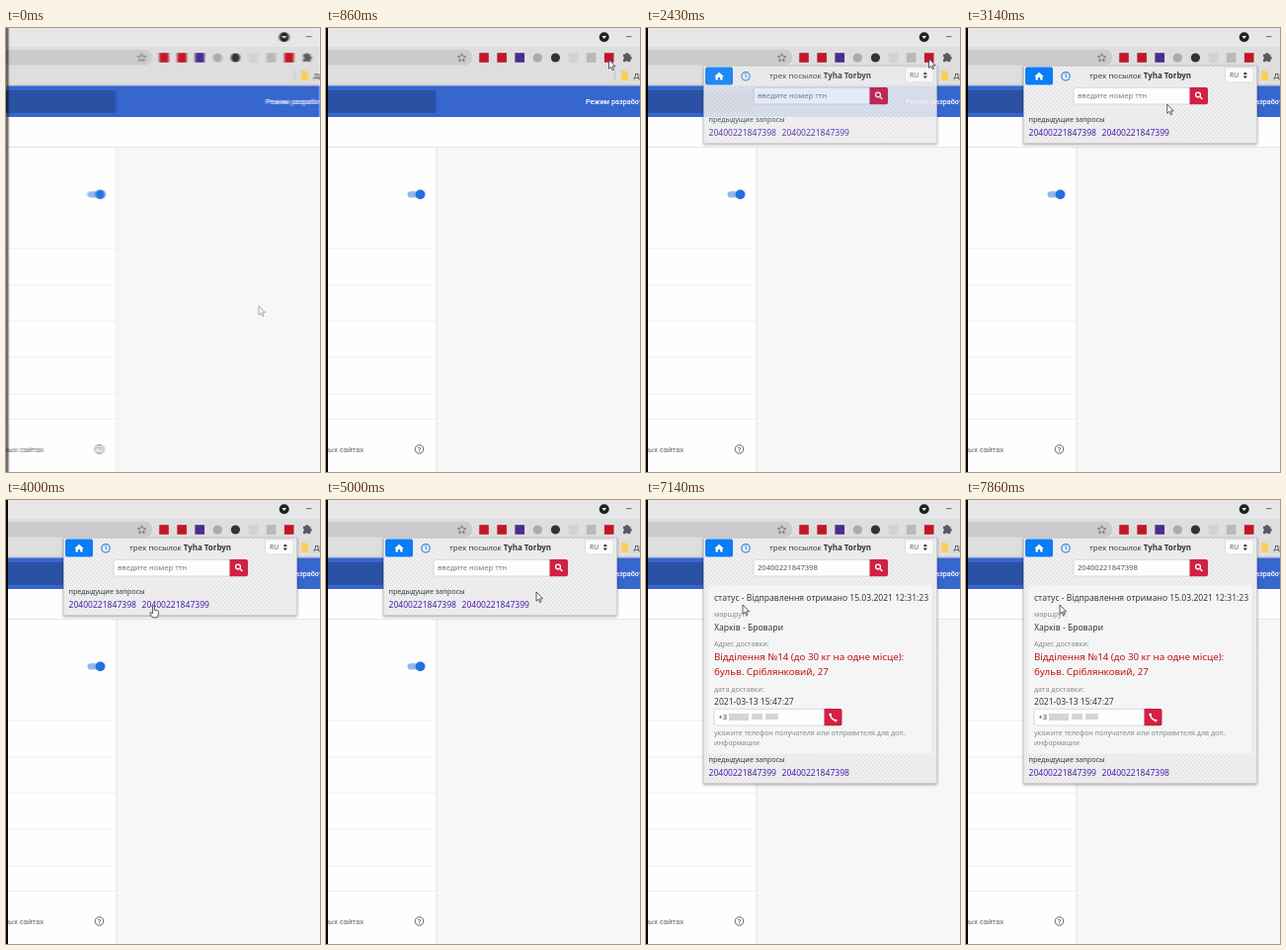
Write an HTML page that moves like this. It is 318 by 449 pixels and loops after 8 s.

```html
<!DOCTYPE html>
<html lang="ru">
<head>
<meta charset="utf-8">
<style>
  html, body { margin: 0; width: 100%; height: 100%; overflow: hidden; background: #fff; }
  svg { display: block; width: 318px; height: 449px; }
  text { font-family: "Noto Sans", "Open Sans", sans-serif; fill: #33383d; white-space: pre; }
  .ui { font-family: Roboto, sans-serif; }
  .body { font-size: 8.55px; }
  .field { font-size: 7.6px; }
  .hint { font-size: 7.1px; fill: #85898d; }
  .link { font-size: 8.56px; fill: #4b1fae; }
  .place { font-size: 9.75px; fill: #bd1010; }
</style>
</head>
<body>
<svg viewBox="0 0 318 449">
  <defs>
    <pattern id="weave" width="4" height="4" patternUnits="userSpaceOnUse">
      <rect width="4" height="4" fill="#f1f1f2"/>
      <path d="M0 2L2 0L4 2L2 4Z" fill="none" stroke="#e3e3e5" stroke-width=".7"/>
    </pattern>
    <filter id="shadow" x="-10%" y="-10%" width="120%" height="130%">
      <feDropShadow dx="0" dy="1" stdDeviation="1.5" flood-opacity=".4"/>
    </filter>
    <filter id="soften" filterUnits="userSpaceOnUse" x="0" y="0" width="318" height="449" color-interpolation-filters="sRGB">
      <feGaussianBlur stdDeviation="1.3 .7" edgeMode="duplicate"/>
    </filter>
    <g id="lens" fill="none" stroke="#fff" stroke-width="1.3">
      <circle cx="-.8" cy="-.8" r="2.4"/><path d="M1 1L3.6 3.6"/>
    </g>
  </defs>

  <g id="page">
    <rect width="318" height="449" fill="#fefefe"/>
    <!-- browser chrome -->
    <rect width="318" height="20" fill="#e8e7e7"/>
    <rect y="19" width="318" height="40" fill="#dedede"/>
    <rect x="-20" y="22" width="168" height="15.5" rx="7.7" fill="#cbcbcb"/>
    <path d="M0 57.5H318" stroke="#c8c8c8"/>
    <circle cx="281.7" cy="9.3" r="5" fill="#202226"/>
    <path d="M279.4 8.1h4.6l-2.3 3z" fill="#fff"/>
    <path d="M304 8.7h5.5" stroke="#444" stroke-width=".8"/>
    <path d="M137.5 25.8l1.2 2.7 3 .3-2.3 2 .7 2.9-2.6-1.5-2.6 1.5.7-2.9-2.3-2 3-.3z" fill="none" stroke="#606468" stroke-width=".8"/>
    <g id="extensions"></g>
    <path d="M301 26.5h2.3a1.5 1.5 0 0 1 3 0h2v2.3a1.5 1.5 0 0 1 0 3v2.5h-2.5a1.5 1.5 0 0 0-2.8 0h-2v-2.6a1.5 1.5 0 0 0 0-2.8z" fill="#55595d"/>
    <path d="M292.5 42v11" stroke="#c3c3c3"/>
    <path d="M299.3 43h3l1 1h2.7v9h-6.7z" fill="#f7cf58"/>
    <text class="ui" x="311.5" y="50.5" font-size="7.7">Другие</text>
    <!-- extensions page -->
    <rect y="58.5" width="318" height="31.5" fill="#3766cf"/>
    <rect x="-5" y="63" width="116.5" height="23" rx="2" fill="#2b51a4"/>
    <text class="ui" x="263" y="76.5" font-size="7.3" font-weight="500" style="fill:#fff">Режим разработчика</text>
    <rect x="112" y="121" width="206" height="328" fill="#f5f7f9"/>
    <path d="M0 120.5H318M111.9 121V449" stroke="#e1e3e6" stroke-width=".9"/>
    <path d="M0 223H111M0 260H111M0 296.5H111M0 333H111M0 370H111M0 395.5H111" stroke="#ececee" stroke-width=".9"/>
    <rect x="82.5" y="165.2" width="15" height="6.2" rx="3.1" fill="#92b6ee"/>
    <circle cx="95.5" cy="168.3" r="4.9" fill="#2471df"/>
    <text class="ui" x="38" y="428.5" font-size="7.7" text-anchor="end" style="fill:#5f6368">данных сайтах</text>
    <circle cx="94.5" cy="426" r="4.3" fill="none" stroke="#505458" stroke-width=".9"/>
    <text class="ui" x="94.5" y="428.6" font-size="7" text-anchor="middle">?</text>
    <rect width="2" height="449" fill="#070707"/>
  </g>

  <g id="popup">
    <rect id="panel" x="58.5" y="38.5" width="236" height="78" fill="url(#weave)" stroke="#c4c4c4" stroke-width=".6" filter="url(#shadow)"/>
    <rect x="60" y="39.5" width="28" height="18" rx="2" fill="#087df7"/>
    <path d="M69.3 49l4.7-4.2 4.7 4.2h-1.2v3.6h-2.4v-2.6h-2.2v2.6h-2.4V49z" fill="#fff"/>
    <g fill="none" stroke="#2580e2">
      <circle cx="101" cy="48.8" r="4.2" stroke-width="1.1"/>
      <path d="M101 46.2v2.8l1.6 1" stroke-width=".9"/>
    </g>
    <text x="125" y="51.2" font-size="7.95">трек посылок <tspan font-weight="700">Tyha Torbyn</tspan></text>
    <rect x="262.5" y="40" width="28.5" height="15" rx="2" fill="#fbfbfb" stroke="#d0d0d0" stroke-width=".6"/>
    <text x="267" y="50.3" font-size="6.8" style="fill:#5a6067">RU</text>
    <path d="M280.7 47h4.2l-2.1-2.7zM280.7 48.5h4.2l-2.1 2.7z" fill="#34383c"/>
    <rect x="109" y="60.3" width="118" height="16.7" rx="1.8" fill="#fdfdfd" stroke="#c9cdd1" stroke-width=".7"/>
    <path d="M226.5 60h16.5a2 2 0 0 1 2 2v13.3a2 2 0 0 1-2 2h-16.5z" fill="#d02142"/>
    <use href="#lens" x="235.8" y="68.4"/>
    <text id="query" class="field" x="113" y="71.3"></text>

    <g id="result">
      <rect x="63" y="86.5" width="226.5" height="170" fill="#fff" fill-opacity=".45"/>
      <text class="body" x="69" y="102.2">статус - Відправлення отримано 15.03.2021 12:31:23</text>
      <text class="hint" x="69" y="118">маршрут:</text>
      <text class="body" x="69" y="131.7">Харків - Бровари</text>
      <text class="hint" x="69" y="148">Адрес доставки:</text>
      <text class="place" x="69" y="162.2">Відділення №14 (до 30 кг на одне місце):</text>
      <text class="place" x="69" y="177.3">бульв. Сріблянковий, 27</text>
      <text class="hint" x="69" y="194">дата доставки:</text>
      <text class="body" x="69" y="207">2021-03-13 15:47:27</text>
      <rect x="69" y="211.3" width="112" height="16.7" rx="1.8" fill="#fdfdfd" stroke="#c9cdd1" stroke-width=".7"/>
      <text class="field" x="73.5" y="222.2">+3</text>
      <path d="M84 216h20v7H84zM107 216h11v6h-11zM121 216h13v6h-13z" fill="#d3d5d7"/>
      <path d="M180.5 211h16a2 2 0 0 1 2 2v13.3a2 2 0 0 1-2 2h-16z" fill="#d02142"/>
      <path d="M186.6 216.4q.3 5.6 6 6.6" fill="none" stroke="#fff" stroke-width="1.4"/>
      <path d="M186.6 215.7v2.4M191 223l2.3.1" stroke="#fff" stroke-width="2.3"/>
      <text class="hint" x="69" y="237.8">укажите телефон получателя или отправителя для доп.</text>
      <text class="hint" x="69" y="247.5">информации</text>
    </g>
    <g id="history">
      <text x="63.5" y="95" font-size="7.15">предыдущие запросы</text>
      <text id="firstLink" class="link" x="63.5" y="108.8"></text>
      <text id="secondLink" class="link" x="137.5" y="108.8"></text>
    </g>
  </g>

  <g id="cursor">
    <path id="arrow" d="M0 0V9.2L2.1 7.3L3.6 10.6L5 10L3.6 6.8H6.5Z" fill="#fff" stroke="#333" stroke-width=".8"/>
    <path id="hand" d="M-.9 .5a.9.9 0 0 1 1.8 0V4.2l3.4.8q1 .3.9 1.4L4.6 9.4 3.9 11.8H-.8L-3.2 8.2q-.9-1.5.4-1.6L-.9 7.8Z" fill="#fff" stroke="#333" stroke-width=".8"/>
    <path id="beam" d="M-1.8-4.3H-.5L0-3.8.5-4.3H1.8M0-3.8V3.8M-1.8 4.3H-.5L0 3.8.5 4.3H1.8" fill="none" stroke="#333" stroke-width=".9"/>
  </g>
</svg>
<script>
const $ = id => document.getElementById(id);
const LOOP = 8000, FPS = 7;
const OPEN = 16, CLICK = 50;
const PARCELS = ["20400221847398", "20400221847399"];

// Cursor stops: step, x, y
const STOPS = [
  [0, 256, 281], [1, 256, 281], [6, 286.5, 32], [18, 286.5, 31], [25, 150, 107],
  [30, 149, 107], [35, 213, 93], [38, 213, 93], [44, 98.5, 97],
  [45, 98.5, 97], [48, 98, 106], [51, 98, 106], [54, 95, 106]
];

const badge = (x, color, round) => round
  ? `<circle cx="${x}" cy="30" r="4.6" fill="${color}"/>`
  : `<rect x="${x - 4.8}" y="25.2" width="9.6" height="9.6" fill="${color}"/>`;
$("extensions").innerHTML =
  ["#c4162b", "#c4162b", "#4b2c93", "#a9aaac", "#38302d", "#d2d2d2", "#b9b9b9", "#c4162b"]
    .map((color, i) => badge(160 + 18.1 * i, color, i === 3 || i === 4)).join("");

const show = (id, on) => $(id).style.display = on ? "" : "none";
const within = (x, y, left, top, right, bottom) => x >= left && x <= right && y >= top && y <= bottom;

function cursorAt(step) {
  const next = STOPS.findIndex(stop => stop[0] > step);
  if (next < 0) return STOPS.at(-1).slice(1);
  const [s0, x0, y0] = STOPS[next - 1], [s1, x1, y1] = STOPS[next];
  const p = (step - s0) / (s1 - s0), e = p * p * (3 - 2 * p);
  return [x0 + (x1 - x0) * e, y0 + (y1 - y0) * e];
}

function cursorKind(x, y, step) {
  if (step < OPEN || step >= CLICK) return "arrow";
  if (within(x, y, 63, 101, 206, 110) || within(x, y, 227, 60, 245, 77)) return "hand";
  if (within(x, y, 63, 88, 141, 99) || within(x, y, 109, 60, 227, 77)) return "beam";
  return "arrow";
}

function draw(step) {
  const found = step >= CLICK, soft = step < 1;
  $("page").setAttribute("filter", soft ? "url(#soften)" : "none");
  $("cursor").setAttribute("opacity", soft ? 0.5 : 1);
  $("popup").style.opacity = step < OPEN ? 0 : [0.5, 0.88][step - OPEN] ?? 1;
  $("panel").setAttribute("height", found ? 248 : 78);
  show("result", found);
  $("history").setAttribute("transform", `translate(0 ${found ? 170.3 : 0})`);
  $("query").textContent = found ? PARCELS[0] : "введите номер ттн";
  $("query").style.fill = found ? "#50565c" : "#757b81";
  $("firstLink").textContent = PARCELS[found ? 1 : 0];
  $("secondLink").textContent = PARCELS[found ? 0 : 1];

  const [x, y] = cursorAt(step), kind = cursorKind(x, y, step);
  $("cursor").setAttribute("transform", `translate(${x} ${y})`);
  for (const id of ["arrow", "hand", "beam"]) show(id, id === kind);
}

const start = performance.now();
function tick() {
  const ms = (performance.now() - start) % LOOP;
  draw(Math.floor((ms + 4) * FPS / 1000) % (LOOP * FPS / 1000));
  requestAnimationFrame(tick);
}
tick();
</script>
</body>
</html>
```
